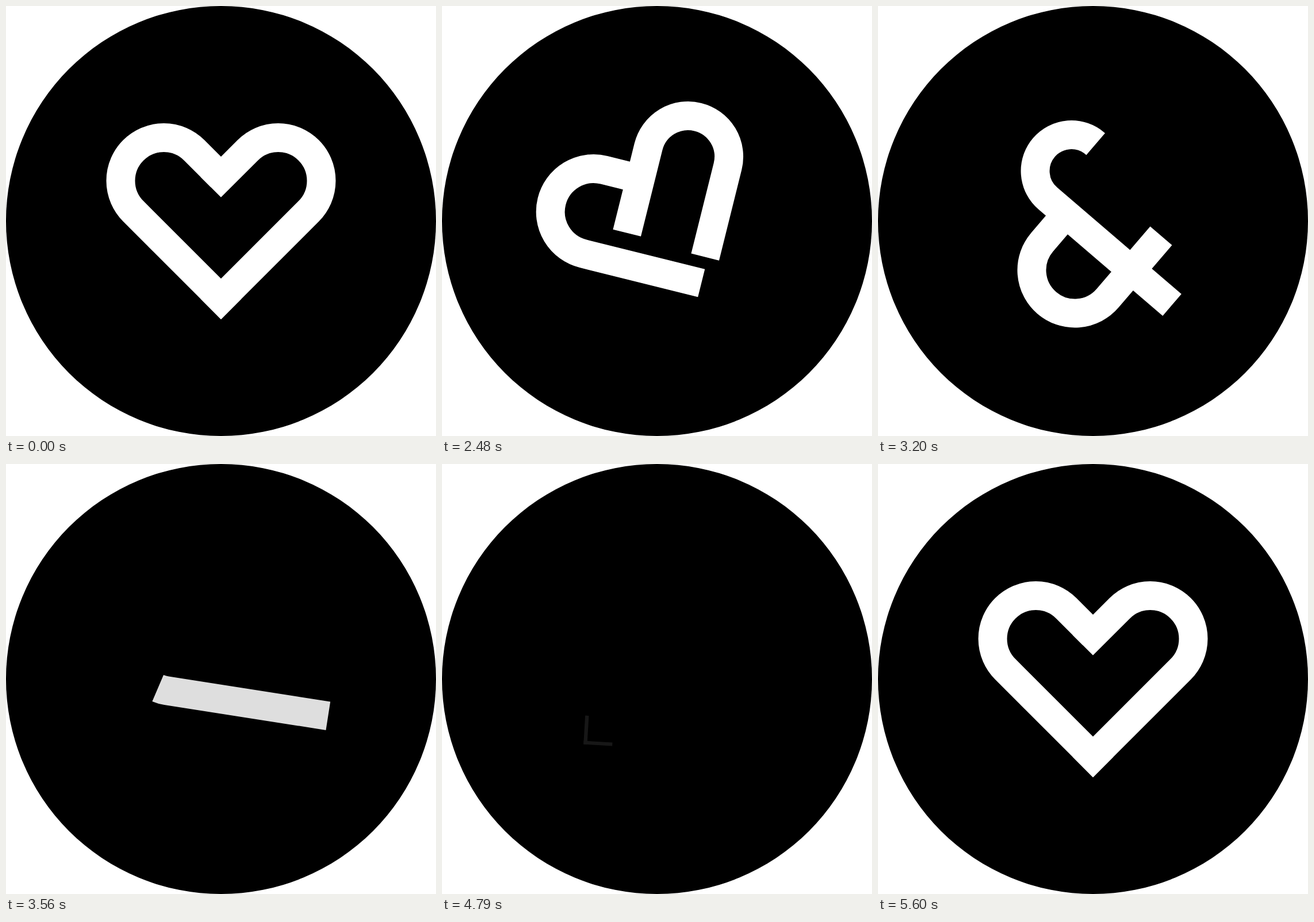
An HTML page for the animation above (7.6 s loop, 748x748 px).

```html
<!DOCTYPE html>
<html lang="en">
<head>
<meta charset="utf-8">
<title>Heart and ampersand</title>
<style>
  html, body { margin: 0; width: 100%; height: 100%; overflow: hidden; background: #fff; }
  svg { display: block; width: 100vw; height: 100vh; }
</style>
</head>
<body>
<svg viewBox="0 0 748 748">
  <circle cx="374" cy="374" r="374"/>
  <g id="mark" fill="none" stroke="#fff" stroke-width="50" stroke-miterlimit="10">
    <path id="left"/>
    <path id="right"/>
  </g>
</svg>
<script>
const LOOP = 7600, HOLD = 2000, STEP = 30;
const mark = document.getElementById('mark');
const left = document.getElementById('left');
const right = document.getElementById('right');

const clamp = v => Math.min(1, Math.max(0, v));
const lerp = (a, b, p) => a + (b - a) * p;

// Smooth curve through [x, y] keys that never overshoots them.
function curve(keys) {
  const slope = i => (keys[i + 1][1] - keys[i][1]) / (keys[i + 1][0] - keys[i][0]);
  const last = keys.length - 1;
  const tangent = keys.map((_, i) => {
    if (i === 0) return 0;
    if (i === last) return slope(i - 1);
    const a = slope(i - 1), b = slope(i);
    return a * b <= 0 ? 0 : 2 * a * b / (a + b);
  });
  return x => {
    if (x <= keys[0][0]) return keys[0][1];
    if (x >= keys[last][0]) return keys[last][1];
    let i = 0;
    while (x > keys[i + 1][0]) i++;
    const h = keys[i + 1][0] - keys[i][0];
    const s = (x - keys[i][0]) / h, s2 = s * s, s3 = s2 * s;
    return keys[i][1] * (2 * s3 - 3 * s2 + 1) + keys[i + 1][1] * (3 * s2 - 2 * s3)
      + h * (tangent[i] * (s3 - 2 * s2 + s) + tangent[i + 1] * (s3 - s2));
  };
}

const spin = curve([[0, 0], [16, 31], [25.5, 60], [40, 94.4], [52, 126.1], [60, 171], [93, 311.6]]);
const driftX = curve([[0, 0], [16, 0.9], [40, 0], [52, -7.4], [60, 0]]);
const driftY = curve([[0, 0], [16, -13.4], [40, 0], [52, 12.3], [60, 0]]);

// A hook: outer leg, half circle, inner leg. side is -1 for left, 1 for right.
function hook(side, cx, cy, r, outer, inner) {
  const k = Math.SQRT1_2;
  const nx = side * r * k, ny = r * k;
  const dx = -side * k, dy = k;
  const at = (s, len) => `${cx + s * nx + dx * len} ${cy + s * ny + dy * len}`;
  return {
    d: `M${at(1, outer)}L${at(1, 0)}A${r} ${r} 0 0 ${side < 0 ? 1 : 0} ${at(-1, 0)}L${at(-1, inner)}`,
    length: outer + Math.PI * r + inner
  };
}

function draw(el, shape, from, to) {
  el.setAttribute('d', shape.d);
  el.setAttribute('stroke-dasharray', `0 ${from} ${Math.max(0, to - from)} 9999`);
}

function render(time) {
  const t = time % LOOP;
  const n = Math.min(120, Math.max(0, Math.floor((t - HOLD) / STEP + 1e-6)));
  const entering = n > 60 || n === 0;
  const hidden = n >= 60 && n < 93;
  mark.style.display = hidden ? 'none' : '';
  if (hidden) return;

  const turn = n < 93 ? spin(n) : 360 - 48.4 * (1 - (n - 93) / 27) ** 2;
  const p = entering ? 0 : clamp(turn / 94.4);
  const a = hook(-1, lerp(-99.5, -82.8, p), lerp(-70, -38, p), 75,
    lerp(240.7, 143, p ** 1.1), lerp(65.8, 64, p));
  const b = hook(1, lerp(99.5, 89.6, p), lerp(-70, -30.7, p), lerp(75, 63, p),
    lerp(240.7, 1.5, p), lerp(90.8, 284.5, p));

  let opacity = 1;
  if (n >= 93) {
    const grown = 1 - (1 - clamp((n - 92.9) / 27)) ** 3;
    draw(left, a, 0, a.length * grown);
    draw(right, b, 0, b.length * grown);
    opacity = clamp((n - 92) / 11);
  } else {
    const gone = Math.max(0, n - 40);
    draw(left, a, a.length * clamp((gone / 11) ** 1.6), a.length);
    draw(right, b, b.length * clamp((gone / 20) ** 1.9), b.length);
    opacity = clamp(1 - (n - 50.85) / 9);
  }
  mark.setAttribute('opacity', opacity);
  mark.setAttribute('transform',
    `translate(${374 + driftX(n)} ${374 + driftY(n)}) rotate(${-turn})`);
}

let start;
function tick(now) {
  if (start === undefined) start = now;
  render(now - start);
  requestAnimationFrame(tick);
}
render(0);
requestAnimationFrame(tick);
</script>
</body>
</html>
```
